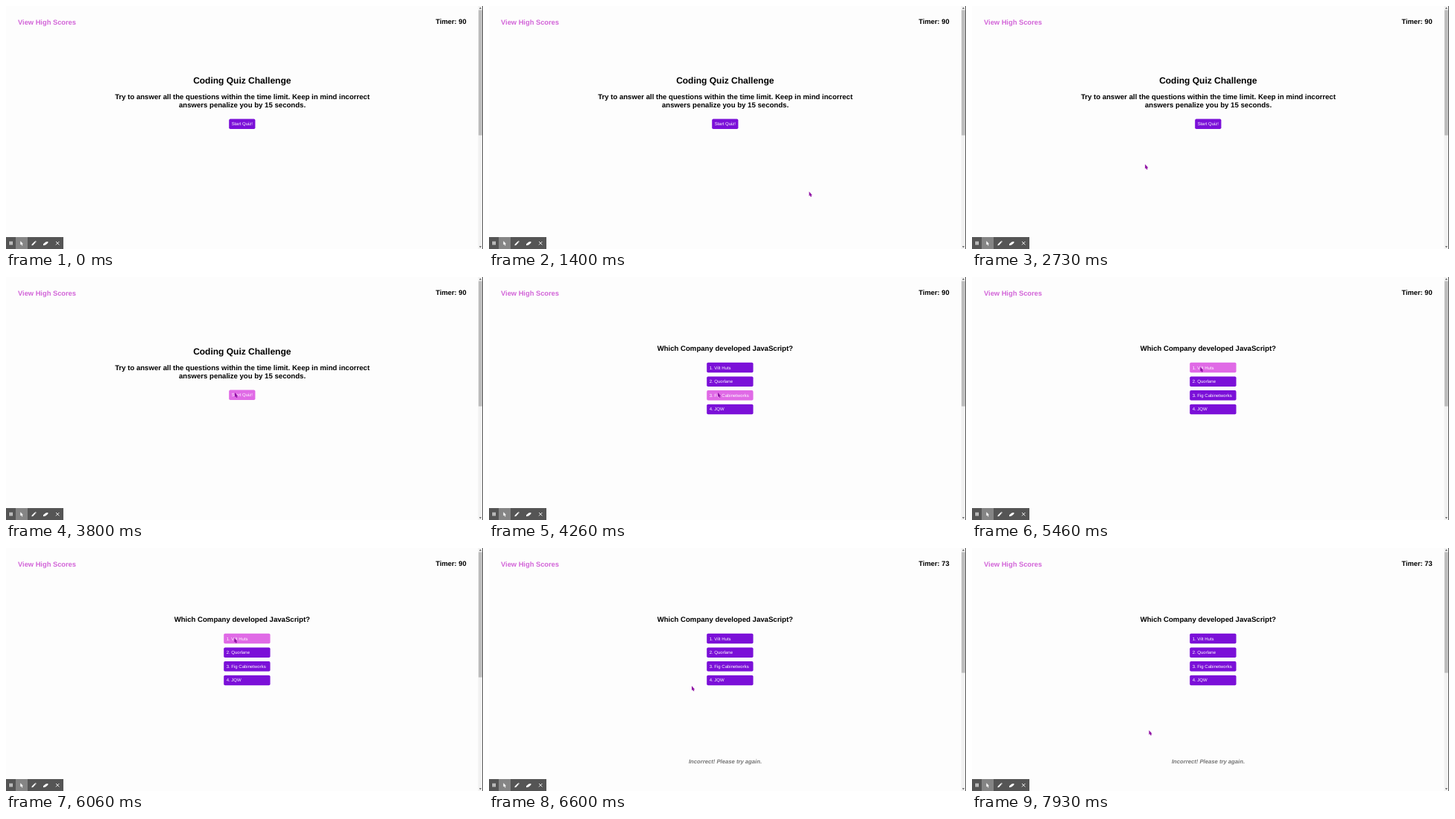
Write an HTML page that moves like this. It is 640x326 px and loops after 8000 ms.

```html
<!DOCTYPE html>
<html lang="en">
<head>
<meta charset="utf-8">
<title>Coding Quiz</title>
<style>
  html, body { margin: 0; width: 100%; height: 100%; overflow: hidden; background: #fdfdfd; }
  svg { display: block; width: 100%; height: 100%; }
  text { font-family: "Liberation Sans", Arial, sans-serif; text-rendering: geometricPrecision; }
  .bold { font-weight: bold; font-size: 9.6px; }
  .nav { font-weight: bold; font-size: 9.32px; }
  .mid { text-anchor: middle; }
  .button rect { fill: #7b10d8; }
  .button.hover rect { fill: #e06ae6; }
  .button text { fill: #fff; font-size: 6px; }
</style>
</head>
<body>
<svg id="stage" viewBox="0 0 640 326">
  <rect width="640" height="326" fill="#fdfdfd"/>
  <text class="nav" x="16" y="24.5" fill="#d264d8">View High Scores</text>
  <text class="nav" id="timer" x="576.4" y="24.3"></text>

  <g id="intro">
    <text class="bold mid" x="316.8" y="103.6" style="font-size:12px">Coding Quiz Challenge</text>
    <text class="bold mid" x="317" y="125.3">Try to answer all the questions within the time limit. Keep in mind incorrect</text>
    <text class="bold mid" x="317" y="136.3">answers penalize you by 15 seconds.</text>
  </g>
  <g id="quiz">
    <text class="bold mid" x="316.8" y="99.3">Which Company developed JavaScript?</text>
  </g>
  <text id="message" class="bold mid" x="317" y="289.2" fill="#777" style="font-size:7.68px;font-style:italic">Incorrect! Please try again.</text>

  <g id="scrollbar">
    <rect x="633.5" width="6" height="326" fill="#f1f1f1"/>
    <rect id="thumb" x="634" y="5.5" width="4.8" fill="#bdbdbd"/>
    <path d="M634.8 3.8l1.6-2 1.6 2zM634.8 322.2l1.6 2 1.6-2z" fill="#555"/>
    <rect x="639.2" width="0.8" height="326" fill="#333"/>
  </g>

  <g id="toolbar">
    <rect y="310" width="77" height="16" fill="#555"/>
    <rect x="13" y="310" width="16" height="16" fill="#858585"/>
    <g fill="#fff">
      <path d="M4.8 315.8h1.4v4.8h-1.4zM7.2 315.8h1.4v4.8h-1.4z"/>
      <path d="M19.3 315.3v5.3l1.2-1 1 2 .9-.4-.9-2h1.5z"/>
      <path d="M34.3 321.3l.5-1.7 3.8-3.8 1.3 1.3-3.8 3.8zM39 315.4l.6-.5 1.2 1.2-.5.6z"/>
      <path d="M50 319.3l3.4-2.8 3-.5v1.8l-3.2 2.8-3.2.6z"/>
    </g>
    <path d="M67 316l4.4 4.4M71.4 316l-4.4 4.4" stroke="#fff" stroke-width="0.9"/>
  </g>

  <path id="cursor" d="M0 0v6l1.2-.9.9 2 1.4-.6-.8-1.8h1.5z" fill="#8f0fa4"/>
</svg>
<script>
const LOOP = 8000, CURSOR_IN = 1260, START_CLICK = 3900, ANSWER_CLICK = 6130;
const SVG = "http://www.w3.org/2000/svg";
const byId = id => document.getElementById(id);
const intro = byId("intro"), quiz = byId("quiz"), message = byId("message");
const timer = byId("timer"), thumb = byId("thumb"), cursor = byId("cursor");

// time, x, y of the pointer tip
const path = [
  [1260, 438, 265], [1400, 429.5, 249], [2000, 232.2, 212.3], [3200, 232.2, 212.3],
  [3750, 307, 155], [4260, 307, 155], [4850, 309, 224], [5060, 309, 224],
  [5440, 306.3, 120.6], [6130, 306.3, 120.6], [6600, 272, 185], [7600, 237.5, 244.5]
];

function make(parent, tag, attrs, content = "") {
  const node = document.createElementNS(SVG, tag);
  for (const name in attrs) node.setAttribute(name, attrs[name]);
  node.textContent = content;
  return parent.appendChild(node);
}

function addButton(parent, x, y, width, label) {
  const node = make(parent, "g", { class: "button" });
  make(node, "rect", { x, y, width, height: 13.5, rx: 1.8 });
  make(node, "text", { x: x + 3.5, y: y + 8.7 }, label);
  return { node, parent, x, y, width };
}

const buttons = [
  addButton(intro, 299.2, 151.6, 35.2, "Start Quiz!"),
  ...["Vilt Huts", "Quorlane", "Fig Cabinetworks", "JQW"].map((name, i) =>
    addButton(quiz, 292.2, 114.8 + i * 18.65, 62.3, `${i + 1}. ${name}`))
];

function pointerAt(t) {
  const next = path.findIndex(p => p[0] > t);
  if (next < 0) return path[path.length - 1].slice(1);
  if (next === 0) return path[0].slice(1);
  const [t0, x0, y0] = path[next - 1], [t1, x1, y1] = path[next];
  const u = (t - t0) / (t1 - t0), k = u * u * (3 - 2 * u);
  return [x0 + (x1 - x0) * k, y0 + (y1 - y0) * k];
}

const show = (node, on) => node.setAttribute("visibility", on ? "visible" : "hidden");

function render(t) {
  const [x, y] = pointerAt(t);
  const started = t >= START_CLICK, answered = t >= ANSWER_CLICK, pointing = t >= CURSOR_IN;
  show(intro, !started);
  show(quiz, started);
  show(message, answered);
  show(cursor, pointing);
  cursor.setAttribute("transform", `translate(${x} ${y})`);
  timer.textContent = `Timer: ${answered ? 73 : 90}`;
  thumb.setAttribute("height", answered ? 162 : 168);
  for (const b of buttons) {
    const inside = x > b.x && x < b.x + b.width && y > b.y && y < b.y + 13.5;
    b.node.classList.toggle("hover", pointing && inside);
  }
}

const origin = performance.now();
function tick() {
  render((performance.now() - origin) % LOOP);
  requestAnimationFrame(tick);
}
tick();
</script>
</body>
</html>
```
